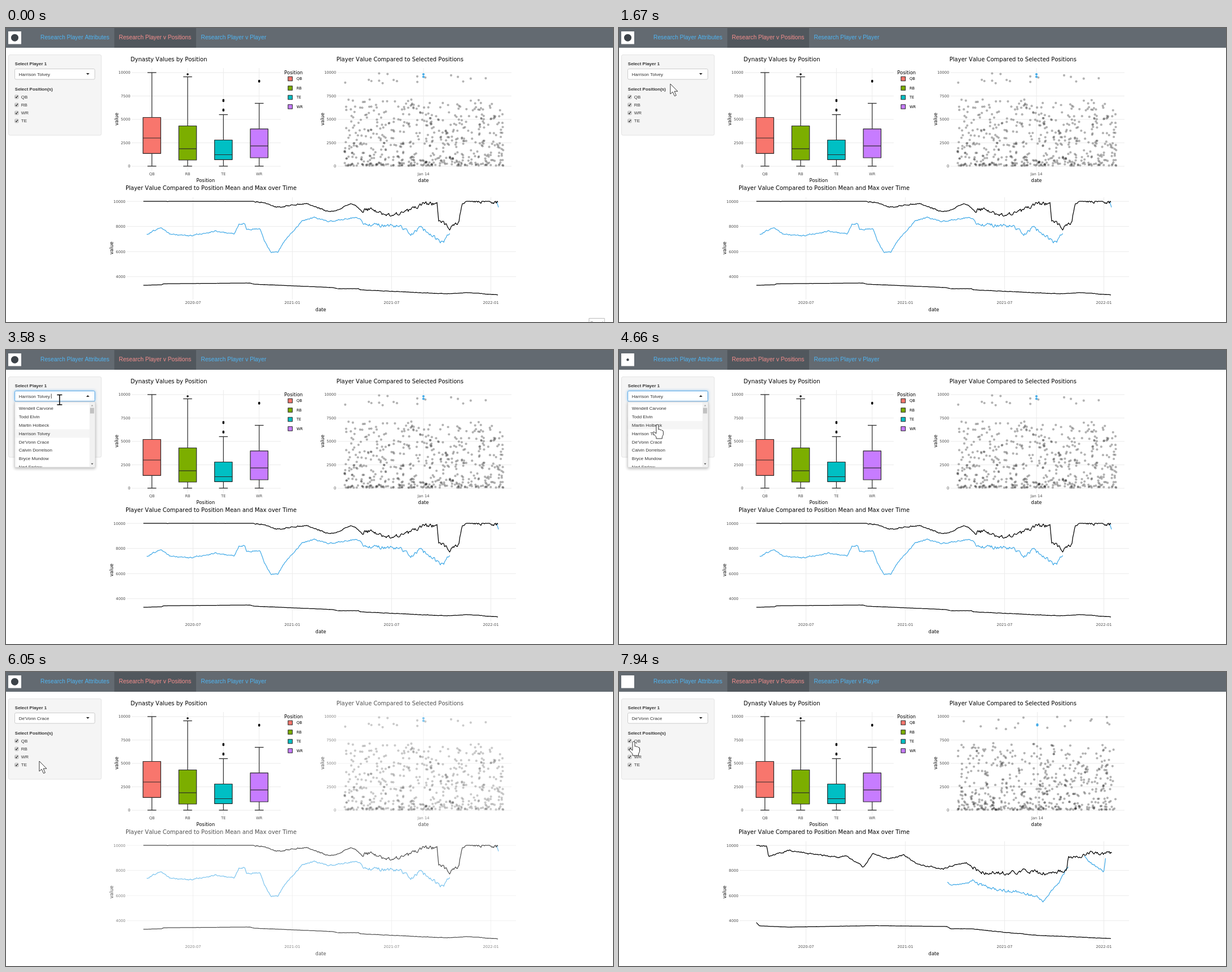
These frames come from a looping animation (1076x521 px, 8000 ms). An HTML page with a canvas:

```html
<!DOCTYPE html>
<html lang="en">
<head>
<meta charset="utf-8">
<title>Player dashboard</title>
<style>
html, body { margin: 0; width: 100%; height: 100%; overflow: hidden; background: #fff; }
canvas { display: block; }
</style>
</head>
<body>
<canvas id="stage" width="1076" height="521"></canvas>
<script>
const LOOP = 8000;
const ctx = document.getElementById('stage').getContext('2d');
const SANS = '"Liberation Sans", Arial, sans-serif';
const PLOT = '"DejaVu Sans", Verdana, sans-serif';
const BLUE = '#46ace8', GRID = '#ebebeb', INK = '#2b2b2b';
const PLAYERS = ['Wendell Carvone', 'Todd Elvin', 'Martin Holbeck', 'Harrison Tolvey',
  'De\'Vonn Crace', 'Calvin Dorrelson', 'Bryce Mundow', 'Ned Farlow'];

// Event times in ms
const OPEN = 3150, CARET_OFF = 3900, PICK = 5300, FADE = 5970, REDRAW = 6400;

// Time, x, y of the pointer
const POINTER = [[150, 1045, 530], [1500, 91, 99], [2600, 91, 99], [2900, 95, 88], [4180, 95, 88],
  [4660, 68, 132], [4920, 62, 157], [5700, 59, 158], [6500, 59, 158], [7000, 73, 168], [7700, 26, 123]];

const clamp = (v, lo = 0, hi = 1) => Math.min(hi, Math.max(lo, v));
const mix = (a, b, u) => a + (b - a) * u;

function random(seed) {
  return () => {
    seed = (seed * 1664525 + 1013904223) >>> 0;
    return seed / 4294967296;
  };
}

function tween(keys, t) {
  let i = 1;
  while (i < keys.length - 1 && keys[i][0] < t) i++;
  const a = keys[i - 1], b = keys[i];
  const u = clamp((t - a[0]) / (b[0] - a[0]));
  const e = u * u * (3 - 2 * u);
  return [mix(a[1], b[1], e), mix(a[2], b[2], e)];
}

// A series through x, y pairs with drifting noise that grows in the later half
function series(p, swing, seed) {
  const path = new Path2D(), rnd = random(seed);
  let i = 0, drift = 0;
  for (let x = p[0]; x < p[p.length - 2]; x += 1.5) {
    while (p[i + 2] < x) i += 2;
    drift = drift * 0.5 + (rnd() - 0.5) * swing * (x < 625 ? 0.35 : 1);
    path.lineTo(x, Math.max(307, mix(p[i + 1], p[i + 3], (x - p[i]) / (p[i + 2] - p[i])) + drift));
  }
  return path;
}

// Mostly low values, plus a few high outliers
function scatter(seed) {
  const rnd = random(seed);
  return Array.from({ length: 560 }, (_, i) =>
    [mix(599, 882, rnd()), i < 17 ? mix(79, 102, rnd()) : 244 - 118 * rnd() ** 1.8]);
}

const before = {
  tick: 740,
  marks: [82, 86.5],
  dots: scatter(17),
  max: series([243.5, 306, 432, 306, 450, 308, 483, 318, 508, 313, 533, 311, 567, 324, 580, 325,
    612, 312, 633, 322, 650, 321, 670, 331, 690, 331, 722, 321, 738, 311, 764, 312, 767, 340,
    788, 355, 803, 342, 808, 314, 814, 306, 873, 309], 6, 3),
  mean: series([243.5, 456, 276, 455, 279, 453.3, 432, 452, 440, 454, 580, 460, 588, 462,
    625, 462, 627, 464, 780, 471, 820, 469, 873, 473], 0.6, 5),
  player: [series([249.5, 366, 274, 353, 292, 366, 330, 368, 370, 360, 404, 365, 413, 348,
    423, 346, 427, 357, 450, 355, 457, 376, 470, 398, 482, 397, 494, 377, 526, 341, 546, 336,
    574, 343, 622, 335, 636, 348, 700, 352, 720, 365, 733, 353, 774, 381, 788, 362], 6, 7),
    series([870, 308, 874, 321], 0, 1)]
};

const after = {
  tick: 741.5,
  marks: [93, 94.5],
  dots: scatter(29),
  max: series([243.5, 308, 262, 309, 265, 327, 302, 316, 335, 322, 388, 328, 404, 326, 433, 346,
    450, 322, 478, 331, 505, 324, 528, 341, 575, 349, 590, 343, 615, 338, 642, 355, 700, 356,
    720, 352, 760, 358, 793, 350, 797, 327, 826, 326, 838, 318, 874, 323], 6, 11),
  mean: series([243.5, 444, 249, 450, 300, 452, 455, 449.5, 581, 451, 588, 455, 624, 455,
    660, 459, 745, 467, 800, 469, 873, 472.5], 0.6, 13),
  player: [series([582, 373, 588, 378, 620, 374, 628, 366, 636, 375, 670, 386, 715, 391,
    742, 400, 752, 408, 774, 377, 785, 366, 798, 340], 5, 19),
    series([825, 327, 835, 337, 850, 349, 859, 354, 863, 326], 4, 23)]
};

// y is the middle of the capitals
function text(s, x, y, size, color = '#000', align = 'left', font = PLOT, weight = '') {
  ctx.font = `${weight} ${size}px ${font}`;
  ctx.fontKerning = font === PLOT ? 'none' : 'auto';
  ctx.fillStyle = color;
  ctx.textAlign = align;
  ctx.fillText(s, x, y + size * 0.36);
}
const label = (s, x, y, weight) => text(s, x, y, 8, '#333', 'left', SANS, weight);
const tick = (s, x, y, align = 'center') => text(s, x, y, 6.67, '#4d4d4d', align);
const axisTitle = (s, x, y) => text(s, x, y, 8.34, '#000', 'center');

function sideways(s, x, y) {
  ctx.save();
  ctx.translate(x, y);
  ctx.rotate(-Math.PI / 2);
  axisTitle(s, 0, 0);
  ctx.restore();
}

function rect(x, y, w, h, fill, stroke, r = 0, width = 1) {
  ctx.beginPath();
  ctx.roundRect(x, y, w, h, r);
  if (fill) { ctx.fillStyle = fill; ctx.fill(); }
  if (stroke) { ctx.strokeStyle = stroke; ctx.lineWidth = width; ctx.stroke(); }
}

function line(color, width, ...p) {
  ctx.beginPath();
  for (let i = 0; i < p.length; i += 2) ctx.lineTo(p[i], p[i + 1]);
  ctx.strokeStyle = color;
  ctx.lineWidth = width;
  ctx.stroke();
}

function dot(x, y, r, color) {
  ctx.beginPath();
  ctx.arc(x, y, r, 0, 2 * Math.PI);
  ctx.fillStyle = color;
  ctx.fill();
}

function triangle(x, y, w, h, color) {
  ctx.beginPath();
  ctx.moveTo(x - w, y - h);
  ctx.lineTo(x + w, y - h);
  ctx.lineTo(x, y + h);
  ctx.fillStyle = color;
  ctx.fill();
}

// The badge dot rests empty, grows, holds and shrinks every 3.5 s
function badgeRadius(t) {
  const p = (t + 3080) % 3500;
  return 6.5 * clamp(Math.min((p - 540) / 600, (3500 - p) / 200));
}

function nav(t) {
  rect(0, 0, 1076, 35, '#636a71');
  rect(192, 0, 145, 35, '#51575d');
  rect(4, 6, 23, 22.5, '#fff');
  dot(15.5, 17.2, badgeRadius(t), '#3c4248');
  const link = (s, x, color) => text(s, x, 16.3, 10.28, color, 'left', SANS);
  link('Research Player Attributes', 61, '#4fb5f3');
  link('Research Player v Positions', 200, '#f58e8c');
  link('Research Player v Player', 345.5, '#4fb5f3');
}

function sidebar(t, open) {
  rect(4.5, 47.5, 164.5, 142.5, '#f5f5f5', '#e3e3e3', 2.5);
  label('Select Player 1', 15.8, 63.5, 'bold');
  ctx.save();
  if (open) { ctx.shadowColor = 'rgba(102,175,233,.7)'; ctx.shadowBlur = 4; }
  rect(15.5, 72.5, 142, 18.5, '#fff', open ? '#66afe9' : '#ccc', 2.3);
  ctx.restore();
  label(PLAYERS[t < PICK ? 3 : 4], 22.8, 81.8);
  triangle(145, 81.5, 2.9, open ? -1.5 : 1.5, '#222');
  if (open && t < CARET_OFF) line('#222', 0.8, 80.3, 77.5, 80.3, 86);

  label('Select Position(s)', 15.8, 107.8, 'bold');
  ['QB', 'RB', 'WR', 'TE'].forEach((s, i) => {
    const y = 122 + 14.2 * i;
    rect(15.8, y - 2.9, 6, 6, '#efefef', '#8a8a8a', 1, 0.7);
    line('#222', 1.2, 17, y, 18.4, y + 1.6, 20.8, y - 1.8);
    label(s, 26.8, y);
  });
}

function dropdown(py) {
  ctx.save();
  ctx.shadowColor = 'rgba(0,0,0,.25)';
  ctx.shadowBlur = 5;
  ctx.shadowOffsetY = 2;
  rect(15.5, 92, 142.5, 116, '#fff', '#d0d0d0', 1, 0.8);
  ctx.restore();
  ctx.save();
  ctx.beginPath();
  ctx.rect(16, 92, 141.5, 115.5);
  ctx.clip();
  const active = py < 96 ? 3 : Math.floor((py - 96.2) / 14.8);
  PLAYERS.forEach((s, i) => {
    const y = 103.6 + 14.8 * i;
    if (i === active) rect(16, y - 7.4, 132, 14.8, '#f5f5f5');
    label(s, 22.8, y);
  });
  rect(148, 93, 9.5, 115, '#f1f1f1');
  rect(149, 102.5, 7.2, 10, '#c1c1c1');
  triangle(152.7, 98.3, 2, -1.2, '#a3a3a3');
  triangle(152.7, 202, 2, 1.2, '#505050');
  ctx.restore();
}

function valueAxis(labelX, left, right) {
  for (let i = 0; i < 5; i++) {
    const y = 79 + 41.5 * i;
    line(GRID, 1, left, y, right, y);
    tick(10000 - 2500 * i, labelX, y, 'right');
  }
}

// Upper whisker, upper quartile, median, lower quartile, outliers
const BOXES = [
  { name: 'QB', fill: '#F8766D', at: [79, 158.5, 195, 222.3], out: [] },
  { name: 'RB', fill: '#7CAE00', at: [86.5, 173.5, 214, 234], out: [82] },
  { name: 'TE', fill: '#00BFC4', at: [153.5, 198.5, 224.5, 233.3], out: [127.5, 129.5, 144.5, 146.3] },
  { name: 'WR', fill: '#C77CFF', at: [133.5, 178.8, 209, 230], out: [93.5, 95] }
];

function boxPlot() {
  text('Dynasty Values by Position', 220.8, 55.3, 10);
  valueAxis(220.5, 223, 487);
  BOXES.forEach(({ name, fill, at: [top, q3, mid, q1], out }, i) => {
    const x = 258.6 + 63.4 * i, legendY = 90 + 16.5 * i;
    line(GRID, 1, x, 71, x, 253);
    line(INK, 1.2, x, top, x, 244.8);
    for (const y of [top, 244.8]) line(INK, 1.3, x - 7.8, y, x + 7.8, y);
    rect(x - 15.7, q3, 31.4, q1 - q3, fill, INK, 0, 1.2);
    line(INK, 1.2, x - 15.7, mid, x + 15.7, mid);
    for (const y of out) dot(x, y, 1.8, '#000');
    tick(name, x, 258.3);
    rect(500, legendY - 3.8, 7.6, 7.6, fill, INK, 0, 1.1);
    text(name, 515, legendY, 6.67);
  });
  text('Position', 493.3, 78.7, 8.34);
  axisTitle('Position', 353.8, 270.3);
  sideways('value', 196, 161.5);
}

function scatterPlot(d) {
  text('Player Value Compared to Selected Positions', 585.8, 55.3, 10);
  valueAxis(585.3, 587.5, 896);
  line(GRID, 1, d.tick, 71, d.tick, 253);
  for (const [x, y] of d.dots) dot(x, y, 2.1, 'rgba(0,0,0,.3)');
  for (const y of d.marks) dot(d.tick, y, 2.1, BLUE);
  tick('Jan 14', d.tick, 258.3);
  axisTitle('date', 740, 270.3);
  sideways('value', 561, 161.5);
}

function timePlot(d) {
  text('Player Value Compared to Position Mean and Max over Time', 212, 283.5, 10);
  for (let i = 0; i < 4; i++) {
    const y = 307.2 + 44.5 * i;
    line(GRID, 1, 214, y, 904, y);
    tick(10000 - 2000 * i, 211.7, y, 'right');
  }
  ['2020-07', '2021-01', '2021-07', '2022-01'].forEach((s, i) => {
    const x = 331.5 + 176 * i;
    line(GRID, 1, x, 300, x, 481);
    tick(s, x, 486.8);
  });
  ctx.lineWidth = 1.25;
  ctx.lineJoin = 'round';
  ctx.strokeStyle = BLUE;
  d.player.forEach(p => ctx.stroke(p));
  ctx.strokeStyle = '#000';
  ctx.stroke(d.max);
  ctx.stroke(d.mean);
  axisTitle('date', 558, 498.7);
  sideways('value', 187, 390);
}

const ARROW = new Path2D('M0 0V18L4.2 14.2L7.6 21.6L10.4 20.4L7.2 13.2H13Z');
const HAND = new Path2D('M-2 2Q-2 0 0 0Q2 0 2 2V9Q4 7.5 5 9.5Q7 8.5 8 10.5Q10.5 10 10.5 13V18L8.5 22V25H-2V22L-7 16.5Q-9 13 -6 13L-2 16Z');

function pointer(x, y, open) {
  const onInput = x < 158 && y > 72 && y < 92;
  const onLabel = !open && x < 48 && y > 115 && y < 170;
  const onItem = open && y >= 92;
  if (onInput) {
    line('#000', 1.5, x, y - 8.5, x, y + 9);
    for (const dy of [-8.5, 9]) line('#000', 1.5, x - 4.5, y + dy, x + 4.5, y + dy);
    return;
  }
  const shape = onItem || onLabel ? HAND : ARROW;
  ctx.save();
  ctx.translate(x, y);
  ctx.fillStyle = '#fff';
  ctx.strokeStyle = '#222';
  ctx.lineWidth = 0.9;
  ctx.fill(shape);
  ctx.stroke(shape);
  ctx.restore();
}

function draw(t) {
  const open = t >= OPEN && t < PICK;
  const [px, py] = tween(POINTER, t);
  const data = t < REDRAW ? before : after;
  rect(0, 0, 1076, 521, '#fff');
  nav(t);
  boxPlot();
  ctx.globalAlpha = t < REDRAW ? mix(1, 0.3, clamp((t - FADE) / 180)) : 1;
  scatterPlot(data);
  timePlot(data);
  ctx.globalAlpha = 1;
  sidebar(t, open);
  if (open) dropdown(py);
  if (t < 300) {
    rect(1033.5, 514.5, 27.5, 14, '#fff', '#bbb');
    text('Record', 1047.2, 522, 7, '#666', 'center', SANS);
  }
  pointer(px, py, open);
}

const start = performance.now();
function frame() {
  draw((performance.now() - start) % LOOP);
  requestAnimationFrame(frame);
}
frame();
</script>
</body>
</html>
```
